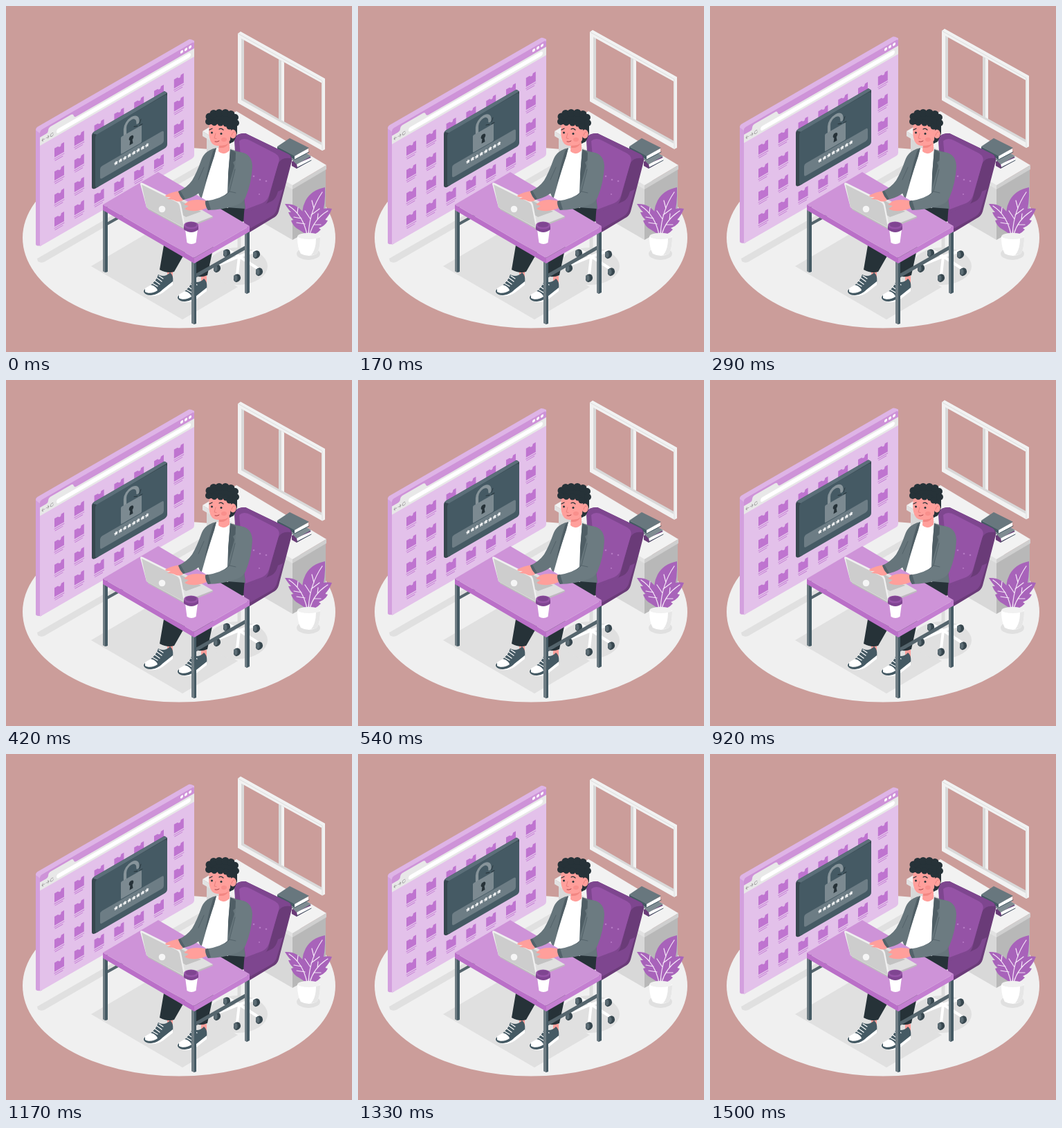
An HTML page for the animation above (1.54 s loop, 500x500 px).

```html
<!DOCTYPE html>
<html lang="en">
<head>
<meta charset="utf-8">
<title>Unlocked screen</title>
<style>
  html, body { margin: 0; height: 100%; overflow: hidden; background: #cb9d9a; }
  svg { display: block; width: 100vw; height: 100vh; }
  .line { fill: none; stroke-linecap: round; stroke-linejoin: round; }
</style>
</head>
<body>
<svg viewBox="0 0 500 500">
  <defs>
    <g id="folder">
      <path fill="#bf74d0" d="M-7-7h5l2 2h2l1-3h4V6H-7z"/>
      <path class="line" stroke="#bf74d0" stroke-width=".9" d="M-7 8.300H7M-6 11H5"/>
    </g>
    <g id="shoe">
      <path fill="#ff9f9b" d="M233 381h8v12h-8z"/>
      <path fill="#455a64" d="M220 388c5 3 12 3 17-3 4 3 5 8 4 15l-14 11c-5 4-11 7-18 7-8 0-13-5-8-9 7-5 15-9 19-21z"/>
      <path fill="#fff" d="M200 409c-4 4 0 8 6 9 8 1 15-3 20-8l15-12v5l-14 11c-8 6-18 6-24 3-5-2-6-5-3-8z"/>
      <path fill="#fff" d="M201 408l8-5c5 1 9 4 10 8-5 4-14 5-18 2z"/>
      <path class="line" stroke="#fff" stroke-width="1.300" d="M212 401l7 4M215 397l7 5M218 393l7 5M221 390l6 4"/>
    </g>
    <g id="caster">
      <path fill="#37474f" d="M-5-3q5-5 9-1 3 6-2 9-5 3-7-2z"/>
      <path fill="#5c6c74" d="M-5-3q3-3 5 0 2 5-2 8-3-1-3-8z"/>
    </g>
  </defs>

  <!-- floor -->
  <ellipse cx="250" cy="335" rx="226" ry="130.500" fill="#f0f0f0"/>
  <g fill="#e0e0e0">
    <path d="M45 365L290 224v10L55 370q-5 2-9-1z"/>
    <path d="M123 376l80-47 132 77-80 47z"/>
    <ellipse cx="335" cy="376" rx="43" ry="27"/>
    <ellipse cx="437" cy="358" rx="17" ry="9"/>
  </g>

  <!-- cabinet and books -->
  <path fill="#d8d8d8" d="M290 188l124 75v75l-124-72z"/>
  <path fill="#b8b8b8" d="M414 262l48-27v76l-48 27z"/>
  <path fill="#f2f2f2" d="M284 181l49-29 130 78-49 29z"/>
  <path fill="#e2e2e2" d="M284 181l130 78v6l-130-77z"/>
  <path fill="#cfcfcf" d="M414 259l49-29v6l-49 29z"/>
  <path fill="#6a3b78" d="M413 225l19-11 9 5v4l-21 12-7-4z"/>
  <path fill="#fff" d="M420 228l21-9v4l-20 10z"/>
  <path fill="#7f8c92" d="M412 221l19-10 10 6-21 12z"/>
  <path fill="#fff" d="M417 216l20-10v5l-20 11-24-14v-5z"/>
  <path fill="#455a64" d="M392 203l25 13v6l-25-14z"/>
  <path fill="#68777e" d="M392 203l18-12 28 14-21 12z"/>
  <path class="line" stroke="#455a64" d="M417 222l21-11M420 234l21-11"/>

  <!-- wall window -->
  <g class="float">
    <path fill="#d9d9d9" fill-rule="evenodd" d="M335 40l4-3 122 68v102l-4 2-122-69zM344 49v85l50 29V77zM402 81v86l54 30v-86z"/>
    <path fill="#f2f2f2" fill-rule="evenodd" d="M335 40l4-3 122 68v102l-4 2-122-69zM340 47v89l116 65v-90z"/>
    <path fill="#f2f2f2" d="M398 79l4 3v85l-4-2z"/>
    <path class="line" stroke="#dedede" d="M335.500 40l121.500 68v100"/>
  </g>

  <!-- browser -->
  <g class="float">
    <g transform="matrix(1 -.577 0 1 49 180)">
      <path fill="#d3a0de" d="M-6-4.500q0-3 3-3L3 0v167.500l-3-1q-6-3-6-6z"/>
      <path fill="#deb4e6" d="M-6-4q0-3.500 4-3.500h217q2 0 8 6.500v5H0z"/>
      <path fill="#e3c1ea" d="M0 3q0-3 3-3h217q3 0 3 3v161.500q0 3-3 3H0z"/>
      <path fill="#ce93d8" d="M0 10V3q0-3 3-3h217q3 0 3 3v7z"/>
      <path fill="#e8e8e8" d="M0 10h9q3 0 3-3 0-4 4-4h29q3 0 4 4 1 3 4 3h170v12H0z"/>
      <rect x="24" y="12.500" width="194" height="6.500" rx="3.200" fill="#fff"/>
      <g fill="#fff"><circle cx="205" cy="4.500" r="2.100"/><circle cx="211" cy="4.500" r="2.100"/><circle cx="217" cy="4.500" r="2.100"/></g>
      <path class="line" stroke="#9a9a9a" stroke-width=".8" d="M7 16H3l1.500-2M3 16l1.500 2M9 16h4l-1.500-2m1.500 2l-1.500 2M19 14.500a2.200 2.200 0 1 0 .5 2"/>
      <g id="folders"></g>
    </g>

    <!-- lock dialog -->
    <g transform="matrix(1 -.577 0 1 129 186.700)">
      <path fill="#37474f" d="M-5-2q0-4 4-4h101l4 5v15L4 77H0q-5-1-5-5z"/>
      <path fill="#5b6f79" d="M-4-5l3-1h99q3 0 6 5L3 1z"/>
      <rect width="104" height="77" rx="4" fill="#455a64"/>
      <rect x="7" y="50" width="92" height="18" rx="3" fill="#6d7d85"/>
      <text x="26.300" y="64.300" font-family="'Liberation Mono', monospace" font-size="12.500" font-weight="700" letter-spacing="-1.100" fill="#fff" stroke="#fff" stroke-width=".3">********</text>
      <path class="line" stroke="#87949a" stroke-width="4.200" stroke-linecap="butt" d="M43 25V15a9.200 9.200 0 0 1 18.400 0v2"/>
      <rect x="37" y="24" width="30" height="25" rx="1.500" fill="#7c8a91"/>
      <circle cx="52" cy="34" r="3.300" fill="#263238"/>
      <path fill="#263238" d="M50.700 35h2.600l1.200 8h-5z"/>
      <path class="line" stroke="#263238" stroke-width=".9" d="M56 20l5 2M64 20l2-5M64 23l4 0"/>
    </g>
  </g>

  <!-- chair -->
  <g class="line" stroke="#dcdcdc" stroke-width="5"><path d="M337 320v40"/><path stroke-width="4" stroke="#fff" d="M337 362l-18-10M337 362l24-8M337 362l28 18M337 362l-3 26M337 362l-30 12"/></g>
  <use href="#caster" x="319" y="357"/><use href="#caster" x="362" y="359"/>
  <use href="#caster" x="366" y="384"/><use href="#caster" x="334" y="393"/><use href="#caster" x="305" y="379"/>
  <path fill="#6a3b78" d="M330 190q6-7 16-6l62 30q6 3 5 10l-19 73q-2 7-9 10l-33 20-14-25z"/>
  <path fill="#7e468f" d="M330 190q6-7 16-6l62 30q4 2 3 6-13-2-18 8l-14 52q-3 8-10 11l-24 14-11-26z"/>
  <path fill="#9553a6" d="M337 195q7-6 17 0l35 18q8 5 5 13l-14 48q-3 8-10 11l-24 9z"/>
  <path fill="#7e468f" d="M344 300l40-18q6-3 9-14l7-3-9 30q-2 6-9 10l-30 17-8-5z"/>
  <g fill="#b579c3"><circle cx="358" cy="246" r="1.300"/><circle cx="367" cy="251" r="1.300"/><circle cx="376" cy="253" r="1.300"/><circle cx="366" cy="272" r="1.100"/></g>

  <!-- legs -->
  <path fill="#263238" d="M305 285l40 3-2 23-10 6-32-20z"/>
  <use href="#shoe"/>
  <use href="#shoe" x="49" y="9"/>
  <path fill="#263238" d="M229 340l30 16-16 28q-10 3-21-3zM270 364l30-17-9 42q-9 4-17 1z"/>

  <!-- torso and neck -->
  <path fill="#fff" d="M303 205l23 3-5 84-39-12z"/>
  <path fill="#ff9f9b" d="M308 194h15v15q-9 8-16 1z"/>
  <path fill="#f28682" d="M308 201q8 2 14-3-4 8-14 7z"/>
  <path fill="#66757b" d="M304 205q-12 2-17 12l-12 46 7 17 8-28z"/>
  <path fill="#4f5e65" d="M304 205l-7 6-11 49 5-13 10-30z"/>
  <path fill="#66757b" d="M324 207l21 6q12 7 10 26l-11 38 2 16-27-2 2-45z"/>
  <path fill="#4f5e65" d="M324 207l8 5 1 10-5 4 2 5-9 32v-20z"/>

  <!-- desk -->
  <path class="line" stroke="#55656d" stroke-width="4" d="M146 315l34-19"/>
  <path class="line" stroke="#55656d" stroke-width="5" stroke-linecap="butt" d="M274 390l74-42"/>
  <g fill="#455a64"><path d="M140 290h7v94l-3 1-4-2z"/><path d="M268 366h7v93l-3 1-4-2z"/><path d="M345 322h7v92l-4 2-3-2z"/></g>
  <g fill="#6f7d84"><path d="M140 290h3v95l-3-2z"/><path d="M268 366h4v94l-4-2z"/><path d="M345 322h3v94l-3-2z"/></g>
  <path fill="#ba6fc8" d="M140 287l132 77v8l-132-77z"/>
  <path fill="#c47fd1" d="M272 364l80-46v8l-80 46z"/>
  <path fill="#ce93d8" d="M220 240l132 78-80 46-132-77z"/>

  <!-- laptop -->
  <path fill="#bdbdbd" d="M205 291l53 29 41-16v2l-41 17-53-29z"/>
  <path fill="#e0e0e0" d="M205 290l41-17 53 31-41 16z"/>
  <path fill="#c2c2c2" d="M226 284l18-7 38 20-22 8z"/>
  <path fill="#f0f0f0" d="M194 257q0-3 4-1l50 25q4 2 5 6l6 31-3 2-53-29z"/>
  <path fill="#cdcdcd" d="M196 258l50 25q4 2 5 6l6 31-54-29z"/>
  <circle cx="225.500" cy="293.500" r="4.800" fill="#f5f5f5"/>

  <!-- arms -->
  <g fill="#ff9f9b">
    <path d="M252 267q-14 2-22 7 1 3 8 2l-5 3q8 0 13 3 8 2 12-4z"/>
    <path d="M292 282q-18-4-28 0l-7 5 7 2-6 4q7 4 17 3 10-1 19-6z"/>
  </g>
  <path fill="#66757b" d="M300 207q-13 2-18 16-6 17-13 29-7 10-20 16l7 12q22-4 30-19l8-34z"/>
  <path fill="#52626a" d="M249 268l3-1 7 12-3 1q-5-5-7-12z"/>
  <path fill="#6c7b81" d="M332 211q23-1 24 20-1 25-10 46-4 8-14 11-20 7-40 7-4-6-4-13 23-3 35-14l8-29z"/>
  <path fill="#52626a" d="M288 282l4-1 4 13-4 1q-4-5-4-13z"/>
  <path class="line" stroke="#4f5e65" stroke-width=".8" d="M331 236l-8 32-7 6M286 233l-8 18M323 268l9 2"/>

  <!-- head -->
  <path fill="#263238" d="M318 164h16v20q-2 7-5 12l-6 3z"/>
  <path fill="#ff9f9b" d="M295 166q-3 14-1 24 2 11 11 12 12 1 19-8l2-28z"/>
  <ellipse cx="328" cy="185" rx="4.800" ry="6.500" fill="#ff9f9b"/>
  <path class="line" stroke="#e57d7a" stroke-width=".9" d="M326 187q1-5 4-5M303 184l-2 7 3 .5"/>
  <ellipse cx="315" cy="193" rx="4" ry="3" fill="#f98f8c"/>
  <g fill="#263238"><circle cx="297.500" cy="183" r="1.500"/><circle cx="311" cy="184.500" r="1.500"/></g>
  <path class="line" stroke="#263238" stroke-width="1.200" d="M294 179l4-2M308 178q3-2 6 1"/>
  <path class="line" stroke="#a33f43" stroke-width="1" d="M302 196q3 1 6-1"/>
  <g fill="#263238">
    <path d="M291 157l41 0 2 18-11 2-2-7-29 1z"/>
    <circle cx="294" cy="160" r="5.500"/><circle cx="293" cy="167" r="5"/><circle cx="300" cy="155.500" r="5.500"/>
    <circle cx="308" cy="154.500" r="5.500"/><circle cx="317" cy="154.500" r="5.500"/><circle cx="325" cy="156.500" r="5.500"/>
    <circle cx="331" cy="161" r="5"/><circle cx="332" cy="169" r="5"/><circle cx="301" cy="168.500" r="4.500"/>
    <circle cx="310" cy="169" r="4.500"/><circle cx="318" cy="170" r="4.500"/><circle cx="323" cy="174" r="4.500"/>
  </g>

  <!-- cup -->
  <path fill="#fff" d="M259 323h18l-2.500 19q-6.500 4-13 0z"/>
  <path fill="#7f4591" d="M257 318h21v5q-10 8-21 0z"/>
  <ellipse cx="267.500" cy="317" rx="10.500" ry="5.500" fill="#9553a6"/>
  <ellipse cx="267.500" cy="316" rx="8" ry="3.800" fill="#7f4591"/>

  <!-- plant -->
  <g fill="#a863ba">
    <path d="M461 262q-20 4-28 19-8 15-3 33l5 17q4-12 14-18l3-7 4-1q6-18 5-43z"/>
    <path d="M403 286q5 8 9 12l-4 0q3 8 8 11l-4 1q3 9 11 13l12 8q3-20-5-32-10-14-27-13z"/>
    <path d="M471 293q-16-3-25 8-8 10-8 30 10 0 17-8l-3-2q9-3 13-11l-4-1q6-6 10-16z"/>
  </g>
  <path class="line" stroke="#f4e6f7" stroke-width="1.200" d="M437 330q2-35 20-61M435 330q-6-28-26-41M439 330q6-22 26-34M440 308l-8-12M445 293l-3-12M441 302l12-9M427 307l-11-2M432 315l-12-2M421 299l1-8M446 316l9 0M450 309l1-9"/>
  <path fill="#fff" d="M421 333q16-9 33 0 0 18-5 25-11 6-23 0-5-8-5-25z"/>
  <ellipse cx="437.500" cy="332.500" rx="16" ry="4.500" fill="#f1f1f1"/>
  <path fill="#e6e6e6" d="M448 336l6-2q0 17-5 24-4 2-8 2 7-8 7-24z"/>
</svg>
<script>
const LOOP = 1540, HALF = 750, RISE = 10;

let folders = '';
for (let row = 0; row < 4; row++)
  for (let col = 0; col < 7; col++)
    folders += `<use href="#folder" x="${28 + col * 28.8}" y="${45 + row * 33.4}"/>`;
document.getElementById('folders').innerHTML = folders;

const floating = document.querySelectorAll('.float');
function draw(now) {
  const t = now % LOOP;
  const lift = RISE * Math.max(0, 1 - Math.abs(1 - t / HALF));
  floating.forEach(g => g.setAttribute('transform', `translate(0 ${-lift})`));
  requestAnimationFrame(draw);
}
draw(performance.now());
</script>
</body>
</html>
```
